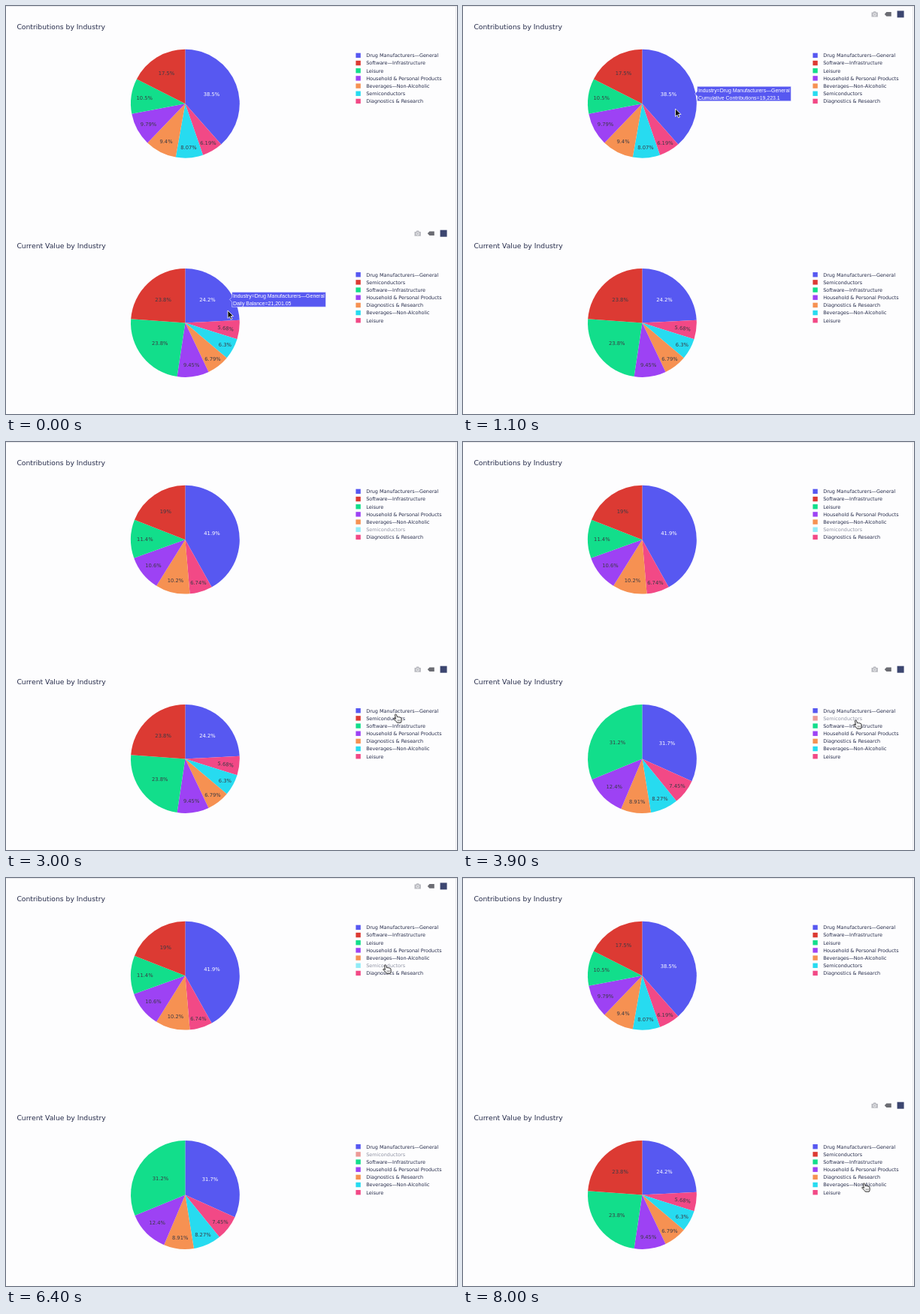
An HTML page that plays this animation: 600x544 px, repeating every 8100 ms.

```html
<!DOCTYPE html>
<html lang="en">
<head>
<meta charset="utf-8">
<style>
  html, body { margin: 0; height: 100%; overflow: hidden; background: #fdfdfe; }
  svg { display: block; width: 600px; height: 544px; font: 6.44px "DejaVu Sans", sans-serif; fill: #252b4a; }
  .title { font-size: 9.25px; }
  .share { font-size: 6.75px; text-anchor: middle; }
  .tip { font: 6.96px "Liberation Sans", sans-serif; fill: #fff; }
</style>
</head>
<body>
<svg id="stage" viewBox="0 0 600 544"></svg>
<script>
const LOOP = 8100, STEP = 100, CX = 238.4, R = 72.4;
const colors = ['#5758f1', '#dc3a33', '#12de8b', '#9d42f4', '#f69152', '#27dbf0', '#f24986'];

// Each item: name, share, and optionally the time span in which it is switched off.
const charts = [
  {
    title: 'Contributions by Industry', top: 0, tip: 'Cumulative Contributions=19,223.1',
    items: [
      ['Drug Manufacturers—General', 38.52],
      ['Software—Infrastructure', 17.51],
      ['Leisure', 10.51],
      ['Household &amp; Personal Products', 9.787],
      ['Beverages—Non-Alcoholic', 9.4],
      ['Semiconductors', 8.07, 1900, 6600],
      ['Diagnostics &amp; Research', 6.194]
    ]
  },
  {
    title: 'Current Value by Industry', top: 292.3, tip: 'Daily Balance=21,201.05',
    items: [
      ['Drug Manufacturers—General', 24.16],
      ['Semiconductors', 23.82, 3400, 7100],
      ['Software—Infrastructure', 23.78, 4500, 5200],
      ['Household &amp; Personal Products', 9.45],
      ['Diagnostics &amp; Research', 6.786],
      ['Beverages—Non-Alcoholic', 6.3],
      ['Leisure', 5.675]
    ]
  }
];

// Pointer path: time, x, y
const path = [
  [0, 295, 406], [500, 292, 400], [900, 287, 330], [1100, 282.5, 137], [1300, 290, 134],
  [1700, 485, 117], [2100, 485, 118.5], [2400, 486, 122], [3000, 515, 362], [3300, 519, 370],
  [4100, 519, 370], [4400, 523, 381], [5500, 523, 381], [6200, 501, 115], [6600, 501, 115],
  [7000, 522, 368], [7100, 523, 370], [7200, 530, 406], [LOOP, 530, 406]
];

function pointerAt(t) {
  const i = path.findIndex(p => p[0] > t);
  const [t0, x0, y0] = path[i - 1], [t1, x1, y1] = path[i];
  const u = (t - t0) / (t1 - t0), e = u * u * (3 - 2 * u);
  return { x: x0 + (x1 - x0) * e, y: y0 + (y1 - y0) * e };
}

const text = (x, y, s, more = '') => `<text x="${x}" y="${y}" ${more}>${s}</text>`;

// Share label: inside the slice's inscribed circle, or along the radius when too narrow
function shareLabel(label, mid, half, cy, fill) {
  const w = (label.length - 2) * 4.3 + 8.7, h = 8;
  let inner = 1 / (1 + 1 / Math.sin(half)), dist = 1 - inner, turn = 0;
  if (2 * inner * R < Math.hypot(w, h)) {
    const a = w / h, m = a + 1 / (2 * Math.tan(half)), s = 1 / (Math.sqrt(m * m + .5) + m);
    dist = Math.cos(s) - s * a;
    turn = mid * 180 / Math.PI % 180 - 90;
  }
  const x = CX + R * dist * Math.sin(mid), y = cy - R * dist * Math.cos(mid);
  return text(0, 2.8, label, `class="share" fill="${fill}" transform="translate(${x} ${y}) rotate(${turn})"`);
}

function tooltip(chart, half, cy) {
  const inner = 1 / (1 + 1 / Math.sin(half)), dist = R * (1 - inner);
  const x = CX + dist * Math.sin(half) + inner * R, y = cy - dist * Math.cos(half);
  return `<path d="M${x} ${y}l3.2-3.2v-6.6h124.8v19.6h-124.8v-6.6z" fill="${colors[0]}" stroke="#fff" stroke-width=".5"/>` +
    text(x + 4.5, y - 1.9, 'Industry=' + chart.items[0][0], 'class="tip"') +
    text(x + 4.5, y + 7.6, chart.tip, 'class="tip"');
}

function modebar(y) {
  return `<g transform="translate(0 ${y})">
    <path d="M543.5 8.6h2l.8-1.4h2.8l.8 1.4h2v5.8h-8.4z" fill="#b9bac0"/>
    <circle cx="547.7" cy="11.4" r="1.7" fill="none" stroke="#fdfdfe" stroke-width=".8"/>
    <path d="M560.8 10.9l2.6-2.8h6.4v5.6h-6.4z" fill="#6b6c73"/>
    <rect x="577.6" y="6.4" width="9" height="9" fill="#3c4670"/></g>`;
}

function drawChart(chart, t, ptr) {
  const cy = chart.top + 130.2;
  const items = chart.items.map(([name, value, from, to], i) =>
    ({ name, value, color: colors[i], off: t >= from && t < to }));
  const shown = items.filter(d => !d.off);
  const total = shown.reduce((sum, d) => sum + d.value, 0);
  let out = text(14.4, chart.top + 31.1, chart.title, 'class="title"'), labels = '', angle = 0;

  // The largest slice starts at the top; the rest follow clockwise from the smallest.
  for (const d of [shown[0], ...shown.slice(1).reverse()]) {
    const sweep = d.value / total * 2 * Math.PI, end = angle + sweep;
    const rim = a => `${CX + R * Math.sin(a)} ${cy - R * Math.cos(a)}`;
    out += `<path d="M${CX} ${cy}L${rim(angle)}A${R} ${R} 0 0 1 ${rim(end)}z" fill="${d.color}"/>`;
    labels += shareLabel(+(100 * d.value / total).toPrecision(3) + '%', angle + sweep / 2, sweep / 2, cy,
      d === shown[0] ? '#fff' : '#3a3a44');
    angle = end;
  }
  out += labels;

  items.forEach((d, i) => {
    const y = chart.top + 65.9 + 10.17 * i;
    out += `<g opacity="${d.off ? .5 : 1}"><rect x="465.4" y="${y - 3.2}" width="6.4" height="6.4" fill="${d.color}"/>` +
      text(479.2, y + 2.4, d.name) + '</g>';
  });

  const first = shown[0].value / total * 2 * Math.PI;
  const dx = ptr.x - CX, dy = ptr.y - cy, bearing = Math.atan2(dx, -dy);
  if (Math.hypot(dx, dy) < R && bearing > 0 && bearing < first) out += tooltip(chart, first / 2, cy);
  return out;
}

function drawPointer({ x, y }, top) {
  const row = y - top - 66, onLegend = x > 462 && row > -6 && row < 66;
  const shape = onLegend
    ? `<path d="M2.5 1.5q1-1.2 2 .1l1 3.2q1-.8 1.8.1q1-.6 1.8.3q1.5-.3 1.8 1l.3 3q0 1.5-.9 3h-5q-.7-1.5-2.4-2.9L.6 7.2q.2-1.3 1.6-.7l1.2 1z" fill="#fff" stroke="#111" stroke-width=".9" stroke-linejoin="round"/>
       <path d="M6 8.3v2M7.6 8.3v2M9.2 8.3v2" stroke="#111" stroke-width=".5"/>`
    : '<path d="M0 0v10.4l2.4-2.2 1.6 3.7 1.8-.7-1.6-3.7h3.3z" fill="#111" stroke="#fff" stroke-width=".8"/>';
  return `<g transform="translate(${x} ${y})">${shape}</g>`;
}

const stage = document.getElementById('stage');
let last = -1;

function frame(now) {
  const t = Math.floor(now % LOOP / STEP) * STEP;
  if (t !== last) {
    last = t;
    const ptr = pointerAt(t), top = charts[ptr.y < 292 ? 0 : 1].top;
    stage.innerHTML = '<path d="M0 .5H600M598.5 0V544" stroke="#e6e6ea"/>' +
      charts.map(c => drawChart(c, t, ptr)).join('') + modebar(top) + drawPointer(ptr, top);
  }
  requestAnimationFrame(frame);
}
frame(0);
</script>
</body>
</html>
```
